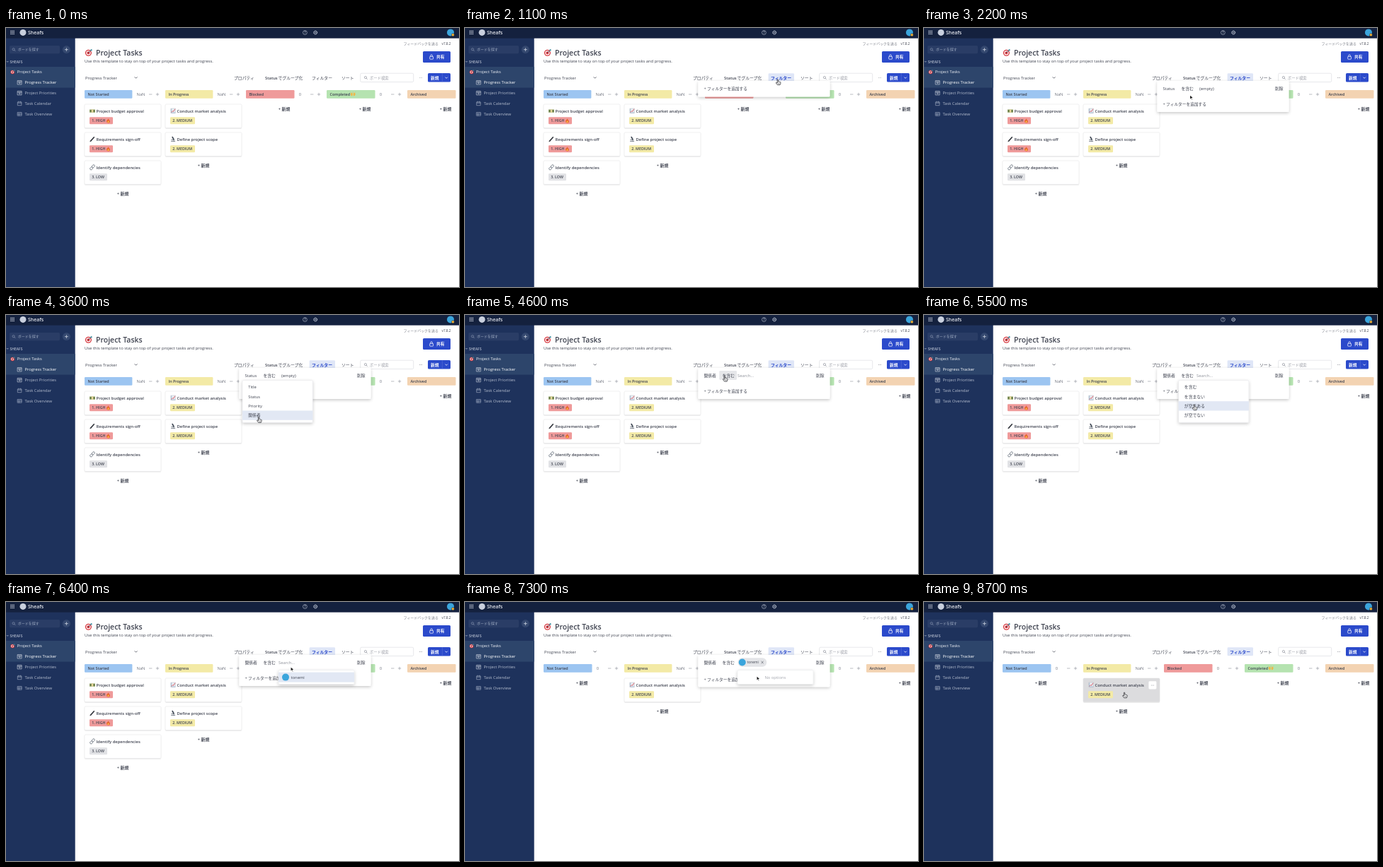
Animation of 640 by 367 pixels, one loop 9.9 s. Source, as an HTML page:

```html
<!DOCTYPE html>
<html lang="ja">
<head>
<meta charset="utf-8">
<title>Task board</title>
<style>
html, body { margin: 0; width: 100%; height: 100%; overflow: hidden; background: #fff; }
svg { display: block; width: 100%; height: 100%; }
text { font-family: "Open Sans", "Noto Sans CJK JP", "Noto Sans CJK", sans-serif; white-space: pre; }
</style>
</head>
<body>
<svg viewBox="0 0 640 367">
  <defs>
    <filter id="soft" x="-10%" y="-25%" width="120%" height="160%">
      <feDropShadow dx="0" dy="1.6" stdDeviation="2.2" flood-color="#000" flood-opacity=".22"/>
    </filter>
    <filter id="thin" x="-5%" y="-10%" width="110%" height="130%">
      <feDropShadow dx="0" dy=".7" stdDeviation=".7" flood-color="#000" flood-opacity=".15"/>
    </filter>
  </defs>
  <g id="base"></g>
  <g id="live"></g>
</svg>
<script>
const LOOP = 9900, STEP = 100;
const INK = '#3f4350', BLUE = '#2b4acb', USER = '#3ba5dc';
const RED = '#ef9a9a', YELLOW = '#f3eaa6';
const USER_NAME = 'tonemi';

// Drawing helpers
const rect = (x, y, w, h, fill, r = 0, more = '') =>
  `<rect x="${x}" y="${y}" width="${w}" height="${h}" rx="${r}" fill="${fill}" ${more}/>`;
const dot = (x, y, r, fill, more = '') => `<circle cx="${x}" cy="${y}" r="${r}" fill="${fill}" ${more}/>`;
const line = (d, color, w = .7, fill = 'none') =>
  `<path d="${d}" stroke="${color}" stroke-width="${w}" fill="${fill}" stroke-linecap="round" stroke-linejoin="round"/>`;
const shape = (d, fill) => `<path d="${d}" fill="${fill}"/>`;
const at = (x, y, body, k = 1) => `<g transform="translate(${x} ${y}) scale(${k})">${body}</g>`;
// y is the middle of the capitals
const text = (s, x, y, { size = 5.84, fill = INK, weight = 400, anchor = 'start' } = {}) =>
  `<text x="${x}" y="${y + size * .36}" font-size="${size}" fill="${fill}" font-weight="${weight}" text-anchor="${anchor}">${s}</text>`;
const mid = (s, x, y, o = {}) => text(s, x, y, { ...o, anchor: 'middle' });
const lens = (x, y, color) =>
  dot(x - .4, y - .4, 1.6, 'none', `stroke="${color}" stroke-width=".55"`) + line(`M${x + .8} ${y + .8}l1.3 1.3`, color, .6);
const chevron = (x, y, color, k = 1.6) => line(`M${x - k} ${y - k / 2}l${k} ${k}l${k} ${-k}`, color, .8);
const dots = (x, y, color) => [-1.7, 0, 1.7].map(d => dot(x + d, y, .45, color)).join('');

// Small pictures, centred on 0,0
const icons = {
  target: dot(0, .4, 4.5, '#d6353c') + dot(0, .4, 3.2, '#fff') + dot(0, .4, 2, '#d6353c') +
    line('M0 .4L3.6 -3.2', '#31485f', 1) + shape('M2.8 -2.6L3.2 -4.4L5 -5L4.9 -3.6L5.6 -3L4.3 -2.2Z', '#3c8ea0'),
  money: rect(-4, -2, 8, 4.4, '#8a9a62', .4) + rect(-1.1, -2, 2.2, 4.4, '#e8d79a') + dot(-2.4, .2, .8, '#55693c') + dot(2.5, .2, .8, '#55693c'),
  pen: line('M-2.6 3L2.4 -2.6', '#33363d', 1.6) + line('M-3.4 3.7L-2.4 2.7', '#777', .6),
  link: line('M-.5 -.9a1.5 1.5 0 0 1 .2 -1.2l1 -1a1.5 1.5 0 0 1 2.2 2.2l-1 1a1.5 1.5 0 0 1 -1.4 .3' +
    'M.5 .9a1.5 1.5 0 0 1 -.2 1.2l-1 1a1.5 1.5 0 0 1 -2.2 -2.2l1 -1a1.5 1.5 0 0 1 1.4 -.3', '#68717d', .9),
  chart: rect(-3.2, -3.4, 6.6, 6.8, '#e9edf2', .3, 'stroke="#a9b2bd" stroke-width=".4"') +
    line('M-2.4 -2.6V2.6H2.8', '#6f91b6', .5) + line('M-2 1.8L-.4 .2L.6 .9L2.7 -2.4', '#d6414b', .8),
  scope: line('M-.8 -2.8L.9 .4', '#3e4652', 1.7) + line('M.4 -1.4A2.6 2.6 0 0 1 .8 2.8M-2.5 3.2H2.7M-2.2 1.1H.5', '#59616d', .8),
  fire: shape('M0 -3.2C1 -1.5 2.9 -.4 2.6 1.5C2.4 3 1.2 3.4 0 3.4C-1.6 3.4 -2.7 2.4 -2.5 .8C-2.3 -.2 -1.7 -.6 -1.4 -1.5C-.6 -1 -.2 -2 0 -3.2Z', '#e8662f') +
    shape('M0 0C.8 1 1.4 1.4 1.2 2.3C1 3.2 -.9 3.3 -1.2 2.3C-1.4 1.5 -.4 1 0 0Z', '#f7c24a'),
  hands: [-1, 1].map(s => `<g transform="scale(${s} 1)">` + shape('M.5 -1.6L2.4 -2.6L3.4 -.8L2.8 1.8L1.2 2.6L.5 1Z', '#edb84c') + '</g>').join('') +
    line('M-3 -2.7L-3.6 -3.3M0 -2.4V-3.4M3 -2.7L3.6 -3.3', '#d8a24a', .4),
  board: line('M-2.8 -2.7H2.8V2.8H-2.8ZM-2.8 -1H2.8M-.8 -1V1.2H.8V-1', '#d5dae5', .6),
  table: line('M-2.8 -2.4H2.8V2.4H-2.8ZM-2.8 -.8H2.8M-2.8 .8H2.8M-1 -.8V2.4', '#aab4c8', .55),
  calendar: line('M-2.6 -2.1H2.6V2.7H-2.6ZM-2.6 -.7H2.6M-1.3 -3V-2M1.3 -3V-2', '#aab4c8', .6)
};

const arrow = shape('M0 0L0 7L1.6 5.5L2.7 8L3.8 7.5L2.8 5.1L5 5Z', '#fff') + shape('M.5 1.2V5.8L1.8 4.7L3 7.2L3.3 7L2.2 4.5L4 4.4Z', '#111');
const hand = line('M-.7 .7a.7 .7 0 0 1 1.4 0V3.2L1.6 3L2.2 3.4L3 3.3L3.5 3.8L4.1 4V5.6L3.3 7.8H-.4L-2.3 5.2L-2.2 4.4L-1.3 4.5L-.7 5Z', '#16181d', .7, '#fff') +
  line('M1 5V6.5M2.2 5V6.5', '#16181d', .4);

const columns = [
  { name: 'Not Started', color: '#9cc5f1' },
  { name: 'In Progress', color: YELLOW },
  { name: 'Blocked', color: RED },
  { name: 'Completed', color: '#b5e3b0' },
  { name: 'Archived', color: '#f3d3b2' }
];
const tags = {
  high: { label: '1. HIGH', color: RED, w: 33 },
  medium: { label: '2. MEDIUM', color: YELLOW, w: 35 },
  low: { label: '3. LOW', color: '#e1e2e5', w: 25 }
};
const tasks = [
  [['money', 'Project budget approval', 'high'], ['pen', 'Requirements sign-off', 'high'], ['link', 'Identify dependencies', 'low']],
  [['chart', 'Conduct market analysis', 'medium'], ['scope', 'Define project scope', 'medium']]
];

function drawBase() {
  const pale = '#c9d0de', light = '#dfe4ee';
  let s = rect(0, 0, 640, 367, '#fff') + rect(0, 0, 97.7, 367, '#1e325c') + rect(0, 0, 640, 14.6, '#14213e');
  for (let i = 0; i < 9; i++) s += rect(6.3 + i % 3 * 2.1, 3.6 + Math.floor(i / 3) * 2.1, 1.3, 1.3, pale);
  s += dot(24, 6.4, 4.5, pale) + text('Sheafs', 31, 6.4, { size: 6.9, weight: 600, fill: '#e6e9f0' });
  s += dot(422.4, 6.5, 2.9, 'none', `stroke="${pale}" stroke-width=".6"`) + mid('?', 422.4, 6.5, { size: 4.4, fill: pale, weight: 600 });
  s += dot(437.2, 6.5, 2.5, 'none', `stroke="${pale}" stroke-width="1" stroke-dasharray="1.3 .66"`) +
    dot(437.2, 6.5, 1.9, 'none', `stroke="${pale}" stroke-width=".5"`) + dot(437.2, 6.5, .7, pale);
  s += dot(628, 6.4, 5, USER) + dot(631.4, 9.8, 2, '#f2b233', 'stroke="#14213e" stroke-width=".5"');

  s += rect(5, 25, 71, 11.2, '#2a3d66', 1.6) + lens(11, 30.6, '#9ba8c0') + text('ボードを探す', 16.8, 30.6, { size: 5, fill: '#9ba8c0' });
  s += dot(85.4, 30.6, 5.5, '#34486f') + line('M83.4 30.6h4M85.4 28.6v4', light, .7);
  s += chevron(2.2, 47.8, '#a7b2c6', 1) + text('SHEAFS', 5.6, 47.8, { size: 4.95, weight: 600, fill: '#b3bccd' });
  s += rect(0, 55, 97.7, 29.6, '#2d456b') + at(9.2, 62.2, icons.target, .6) + text('Project Tasks', 15.8, 62.2, { fill: '#f2f4f8' });
  [['board', 'Progress Tracker'], ['board', 'Project Priorities'], ['calendar', 'Task Calendar'], ['table', 'Task Overview']]
    .forEach(([icon, name], i) => {
      const y = 77.2 + 14.9 * i;
      s += at(19.3, y, icons[icon]) + text(name, 26.4, y, { fill: i ? '#b4bdce' : '#fff' });
    });

  s += text('フィードバックを送る', 561.6, 22, { size: 4.95, fill: '#7b7f89' }) + text('v7.8.2', 615.6, 22, { size: 4.7 });
  s += at(116.4, 34.8, icons.target) + text('Project Tasks', 127, 34.8, { size: 10.5, weight: 600 });
  s += text('Use this template to stay on top of your project tasks and progress.', 111, 47.2);
  s += rect(589, 33, 39, 16, BLUE, 1.6) + rect(598.7, 40.4, 4.8, 3.8, 'none', .5, 'stroke="#fff" stroke-width=".7"') +
    line('M599.8 40.2v-1.1a1.3 1.3 0 0 1 2.6 0v1.1', '#fff', .7) + text('共有', 608, 41.2, { fill: '#fff', weight: 600 });

  s += text('Progress Tracker', 112, 70.6) + chevron(183.6, 70.4, INK);
  s += text('プロパティ', 322, 70.6, { weight: 500 }) + text('Status', 366, 70.6, { weight: 600 }) +
    text('でグループ化', 384.6, 70.6, { weight: 500 }) + text('ソート', 474, 70.6, { weight: 500 });
  s += rect(500.7, 64.2, 75, 12.3, '#fff', 1.6, 'stroke="#cfd1d6" stroke-width=".5"') + lens(508.3, 70.4, '#777b86') +
    text('ボード検索', 513.8, 70.6, { size: 5.4, fill: '#a0a3ab' });
  s += dots(586, 70.4, '#70747f');
  s += rect(596, 64, 32, 12.6, BLUE, 1.6) + line('M616.3 64.2v12.2', '#6f86df', .4) +
    text('新規', 600, 70.5, { fill: '#fff', weight: 600 }) + chevron(622.2, 70.6, '#fff', 1.4);
  return s;
}

function drawTask([icon, title, tagName], x, y, hover) {
  const tag = tags[tagName];
  let s = rect(x, y, 108, 33.6, hover ? '#dcdcde' : '#fff', 1.6, `stroke="#dfe0e3" stroke-width=".45" filter="url(#thin)"`);
  s += at(x + 11, y + 9.4, icons[icon]) + text(title, x + 16.6, y + 9.4, { weight: 600 });
  s += rect(x + 7, y + 18.3, tag.w, 10, tag.color, 1.2) + text(tag.label, x + 10.3, y + 23.3, { size: 5.25, weight: 600 });
  if (tagName === 'high') s += at(x + 33.4, y + 23.2, icons.fire, .95);
  if (hover) s += rect(x + 92.4, y + 4.3, 11, 11.2, '#fff', 1.4) + dots(x + 97.9, y + 10, '#70747f');
  return s;
}

function drawBoard(filtered, hover) {
  return columns.map(({ name, color }, i) => {
    const x = 111 + 114 * i;
    let list = tasks[i] || [];
    if (filtered) list = i === 1 ? list.slice(0, 1) : [];
    const some = list.length > 0;
    let s = rect(x, 88, some ? 67.4 : 68.5, 11.7, color, 1.2) + text(name, x + 4.5, 94, { size: 5.42, weight: 600 });
    if (name === 'Completed') s += at(x + 37.2, 94, icons.hands);
    s += mid(some ? 'NaN' : '0', x + (some ? 79.5 : 76.5), 94, { fill: '#70747f' });
    s += line(`M${x + 91.4} 94h3.6M${x + 101.2} 94h3.6M${x + 103} 92.2v3.6`, '#82868f', .55);
    s += list.map((task, k) => drawTask(task, x, 108 + 40 * k, hover && i === 1)).join('');
    return s + mid('+ 新規', x + 54, 114.8 + 40 * list.length, { weight: 600 });
  }).join('');
}

function drawMenu(x, names, cur) {
  let s = rect(x, 92.6, 99.3, 60, '#fff', 1.6, 'stroke="#d9dade" stroke-width=".4" filter="url(#soft)"');
  names.forEach((name, i) => {
    const y = 95.6 + 13.3 * i;
    if (cur.y >= y && cur.y < y + 13.3) s += rect(x, y, 99.3, 13.3, '#e2e8f4');
    s += text(name, x + 8.2, y + 6.7);
  });
  return s;
}

const during = (t, a, b) => t >= a && t < b;
const within = (p, x, y, w, h) => p.x >= x && p.x < x + w && p.y >= y && p.y < y + h;

function drawPopup(t, cur) {
  const hasRow = t >= 1800, person = t >= 3700, picked = t >= 6800;
  const fieldMenu = during(t, 2700, 3700), ruleMenu = during(t, 4700, 5900), search = t >= 6200;
  const bottom = !hasRow ? 97.5 : picked ? 120.2 : 119;
  let s = rect(329.5, 75, 186, bottom - 75, '#fff', 1.6, 'filter="url(#soft)"');
  if (hasRow) {
    const hover = (x, w) => !fieldMenu && !ruleMenu && within(cur, x, 79, w, 13) ? rect(x, 79, w, 13, '#e6e7ea', 1.4) : '';
    s += hover(334, 24) + hover(359.3, 24.7);
    s += text(person ? '関係者' : 'Status', 337.4, 85.5) + text('を含む', 363.4, 85.5);
    if (!person) s += text('(empty)', 389, 85.5);
    else if (!picked) s += text('Search...', 385, 85.5, { fill: '#8d9099' });
    else s += rect(385.6, 79.2, 40.6, 12.6, '#e4e5e8', 6) + dot(391.7, 85.5, 5, USER) +
      text(USER_NAME, 398.6, 85.5, { size: 4.9 }) + line('M418.8 84.2l2.6 2.6M421.4 84.2l-2.6 2.6', INK, .6);
    s += text('削除', 496, 85.5);
  }
  s += text('+ フィルターを追加する', 337.4, !hasRow ? 86.2 : picked ? 109.6 : 108.4, { size: 5.7 });
  if (fieldMenu) s += drawMenu(334, ['Title', 'Status', 'Priority', '関係者'], cur);
  if (ruleMenu) s += drawMenu(359.6, ['を含む', 'を含まない', 'が空である', 'が空でない'], cur);
  if (search) {
    s += rect(385, 96.6, 107, 20, '#fff', 1.6, 'stroke="#dcdde1" stroke-width=".4" filter="url(#soft)"');
    s += picked ? mid('No options', 438.4, 106.7, { fill: '#a0a3ab' })
      : rect(385, 99.6, 107, 14, '#e2e8f4') + dot(395, 106.6, 5, USER) + text(USER_NAME, 402.5, 106.6);
  }
  return s;
}

// Pointer path: time, x, y
const path = [
  [100, 440, 240], [700, 446, 72], [1000, 446, 72], [1700, 370, 86], [1800, 370, 86], [2200, 375.6, 94.6],
  [2600, 346, 87], [2800, 346, 87], [3200, 356, 145], [3400, 357, 144.6], [3900, 357, 144.6], [4500, 366.6, 86],
  [4900, 368, 88], [5300, 381, 142], [5500, 381.6, 127], [5700, 376, 102], [5900, 376, 102], [6200, 400, 86],
  [6300, 400, 86], [6600, 408, 107], [6800, 408, 107], [7300, 412, 104.6], [7500, 412, 104.6], [7900, 400, 190],
  [8000, 400, 190], [8500, 279.6, 128.6], [8700, 283, 128]
];

function pointer(t) {
  const i = path.findIndex(p => p[0] > t);
  if (i < 0) return { x: path.at(-1)[1], y: path.at(-1)[2] };
  const [a, b] = [path[Math.max(0, i - 1)], path[i]];
  const u = Math.max(0, (t - a[0]) / (b[0] - a[0]));
  const k = u * u * (3 - 2 * u);
  return { x: a[1] + (b[1] - a[1]) * k, y: a[2] + (b[2] - a[2]) * k };
}

function isHand(t, cur, open, onTask) {
  if (onTask) return true;
  if (during(t, 2700, 3700) || during(t, 4700, 5900)) return cur.y > 95 || during(t, 2700, 2900) || t < 5000;
  if (during(t, 6200, 6800)) return cur.y > 99;
  return within(cur, 429, 64, 36, 12) || during(t, 1600, 1900) ||
    (open && t >= 1800 && within(cur, 334, 79, 50, 13));
}

function render(t) {
  const cur = pointer(t), open = during(t, 1000, 8000), filtered = t >= 6800;
  const onTask = !open && filtered && within(cur, 225, 108, 108, 34);
  const active = t >= 1000;
  let s = '';
  if (active) s += rect(428.6, 64.3, 36.4, 12, '#dfe6f7', 1.4);
  else if (t >= 100 && within(cur, 428.6, 64.3, 36.4, 12)) s += rect(428.6, 64.3, 36.4, 12, '#ececee', 1.4);
  s += text('フィルター', 432, 70.6, { weight: active ? 600 : 500, fill: active ? BLUE : INK });
  s += drawBoard(filtered, onTask);
  if (open) s += drawPopup(t, cur);
  if (t >= 100) s += at(cur.x, cur.y, isHand(t, cur, open, onTask) ? hand : arrow);
  document.getElementById('live').innerHTML = s;
}

document.getElementById('base').innerHTML = drawBase();
const start = performance.now();
let shown = -1;
function tick() {
  const t = Math.floor((performance.now() - start) % LOOP / STEP) * STEP;
  if (t !== shown) render(shown = t);
  requestAnimationFrame(tick);
}
tick();
</script>
</body>
</html>
```
